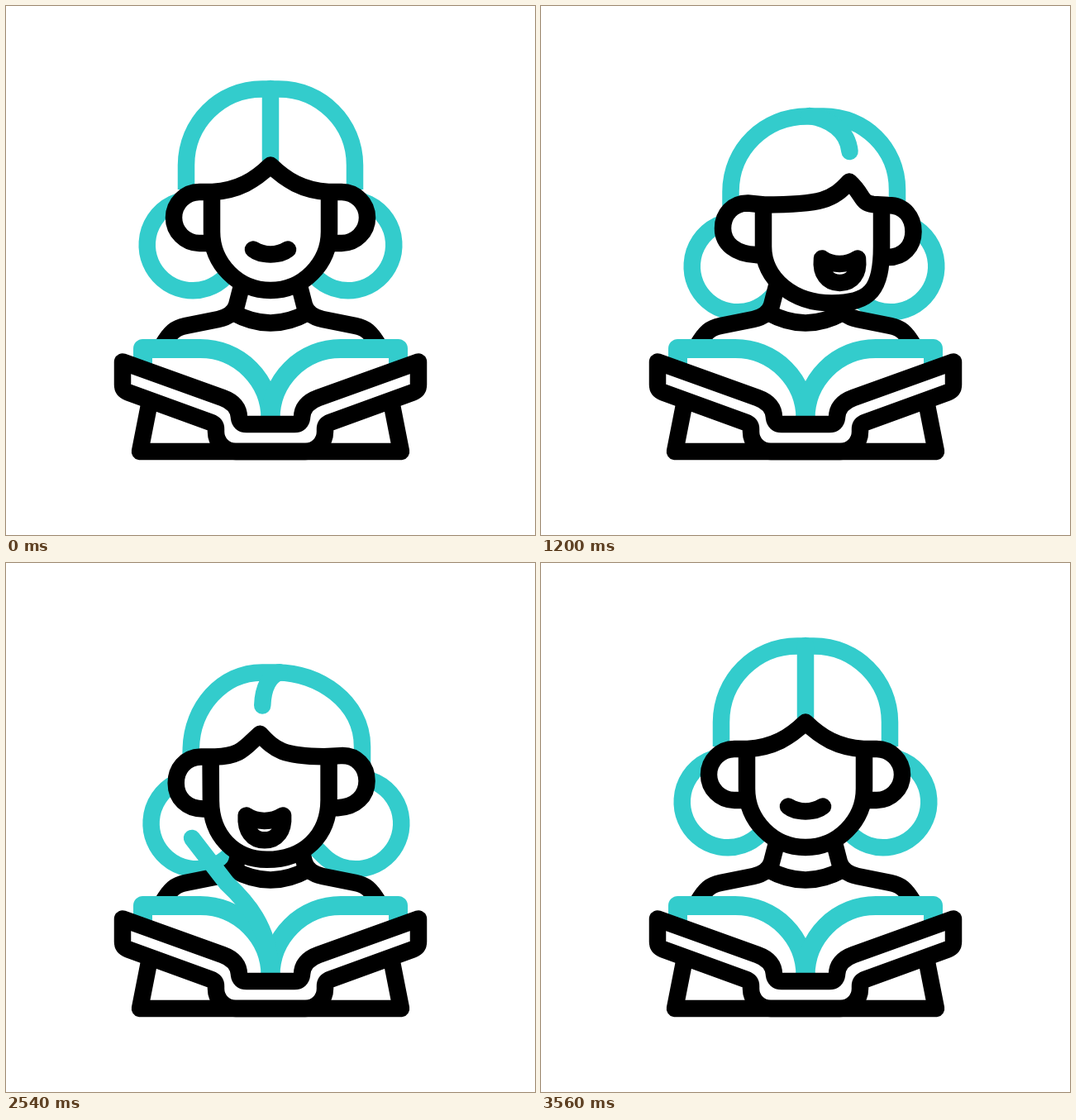
Recreate the animation shown at these times as an HTML page with a canvas. Size 640x640 px, loop 3.6 s.

```html
<!DOCTYPE html>
<html lang="en">
<head>
<meta charset="utf-8">
<title>Reading girl</title>
<style>
html, body { margin: 0; height: 100%; overflow: hidden; background: #fff; }
canvas { display: block; width: 640px; height: 640px; }
</style>
</head>
<body>
<canvas id="stage" width="640" height="640"></canvas>
<script>
const ctx = document.getElementById('stage').getContext('2d');
const CYAN = '#33cccc', BLACK = '#000', WHITE = '#fff';
const LOOP = 3600;

// Each part has three poses: facing front, facing left, facing right.
const parts = {
  dome: [
    'M218 222L218 192.5C218 141.5 259 100.5 310 100.5L330 100.5C381 100.5 422 141.5 422 192.5L422 222',
    'M221 238L221.5 224C223 176 257 132 305 132L323 132C372 132 431 166 431 222L431 248',
    'M229.5 242L229.5 225C229.5 173 271 133.5 322 133.5L342 133.5C391 133.5 431 172 431 222L431 248'
  ],
  parting: [
    'M320 100C320 130 320 160 320 187',
    'M333 132C307 136 287 150 285 171',
    'M325 133C349 137 371 150 373.5 176'
  ],
  face: [
    'M249 225L249 273C249 312 281 344 320 344C359 344 391 312 391 273L391 225',
    'M239 232L239.5 287C240 330 265 358.5 301 358.5C345 358.5 382 325 382 285L382 232',
    'M269 240L269 291C269 330 305 359.5 352 359.5C399 359.5 412 343 412 291L412 240'
  ],
  fringe: [
    'M249 287L234 287C217 287 203 273 203 256C203 239 217 225 234 225L250 225C281 223 301 211 320 192.5C339 211 359 223 390 225L406 225C423 225 437 239 437 256C437 273 423 287 406 287L391 287',
    'M240 296L230 296C212 296 200 283 200 265C200 249 210 234 230 233L246 232C262 231 262 220 281 204.5C300 226.5 315 231.5 378 232L398 230C418 228 431 243 431 260C431 278 417 292 394 293L381 293',
    'M270 302L260 301C236 300 220 288 220 269C220 252 232 238.5 250 238.5L270 240.5C340 240.5 353 234.5 373 212.5C391 229 386 238 402 240L420 241C440 241 450.5 256 450.5 273C450.5 291 438 304 420 304L411 304'
  ],
  mouth: [
    'M299 294.5C312 302.5 328 302.5 341 294.5C338 297 331 300.5 320 300.5C309 300.5 302 297 299 294.5Z',
    'M271 305.5C284 314 302 314 316 305.5C317 324 308 335.5 293.5 335.5C279 335.5 270 324 271 305.5Z',
    'M340 305.5C352 314 370 314 383 305.5C385 324 376 335 361.5 335C347 335 338 324 340 305.5Z'
  ],
  buns: ['M226 289L414 289', 'M228 315L423 315', 'M238 315L423 315']
};

const [FRONT, LEFT, RIGHT] = [0, 1, 2];
const moves = [
  { start: 0, end: 400, from: FRONT, to: LEFT },
  { start: 800, end: 1200, from: LEFT, to: RIGHT, page: true },
  { start: 1600, end: 2000, from: RIGHT, to: LEFT },
  { start: 2400, end: 2800, from: LEFT, to: RIGHT, page: true },
  { start: 3200, end: 3560, from: RIGHT, to: FRONT }
];

const NUMBER = /[\d.]+/g;
const ease = p => p * p * (3 - 2 * p);

function mix(a, b, u) {
  const target = b.match(NUMBER);
  let i = 0;
  return a.replace(NUMBER, n => (+n + (target[i++] - n) * u).toFixed(3));
}

function fill(d, color = WHITE) {
  ctx.fillStyle = color;
  ctx.fill(new Path2D(d));
}

function stroke(d, color = BLACK, width = 20.5, cap = 'butt') {
  ctx.strokeStyle = color;
  ctx.lineWidth = width;
  ctx.lineCap = cap;
  ctx.lineJoin = 'round';
  ctx.stroke(new Path2D(d));
}

function strokeBoth(d, color, width) {
  stroke(d, color, width);
  ctx.save();
  ctx.transform(-1, 0, 0, 1, 640, 0);
  stroke(d, color, width);
  ctx.restore();
}

// Open loops whose lower ends run straight on behind the face.
function drawBuns(d) {
  const [x1, y1, x2, y2] = d.match(NUMBER).map(Number);
  const r = 55.3;
  for (const [x, y, side] of [[x1, y1, -1], [x2, y2, 1]]) {
    const sweep = side > 0 ? 1 : 0;
    stroke(`M${x} ${y - r}A${r} ${r} 0 1 ${sweep} ${x - side * r * Math.SQRT1_2} ${y + r * Math.SQRT1_2}` +
      `l${-10 * side} -10`, CYAN, 20.5, 'round');
  }
}

function drawBody() {
  fill('M286 335L277 372H363L354 335Z');
  strokeBoth('M189 411C199 394 205 389.5 217 387L257 379Q275 375 279 362L286 335');
  stroke('M275 371Q320 396 365 371');
}

function drawPage(u) {
  const c = Math.cos(Math.PI * u), s = Math.sin(Math.PI * u);
  const at = (dx, y, lift) => `${320 - dx * c} ${y - lift * s} `;
  stroke('M320 490C' + at(4, 440, 0) + at(45, 414.5, 5) + at(85, 414.5, 35) +
    'L' + at(152, 414.5, 104.5), CYAN, 20.5, 'round');
}

function drawCover() {
  strokeBoth('M174 478L162 539H320');
  strokeBoth('M320 506H291Q283 506 282 498Q281.5 481 262 474L141 430.5' +
    'V458Q141 465 148 467.5L247 503.5Q254 506 254 512V515A24 24 0 0 0 278 539H320');
}

function draw(time) {
  const t = time % LOOP;
  const move = moves.filter(m => m.start <= t).pop();
  const u = ease(Math.min(1, (t - move.start) / (move.end - move.start)));
  const pose = {};
  for (const name in parts) pose[name] = mix(parts[name][move.from], parts[name][move.to], u);

  ctx.fillStyle = WHITE;
  ctx.fillRect(0, 0, 640, 640);

  drawBuns(pose.buns);
  stroke(pose.dome, CYAN);
  stroke(pose.parting, CYAN, 20.5, 'round');
  drawBody();

  fill(pose.fringe);
  fill(pose.face);
  stroke(pose.face);
  stroke(pose.fringe);
  fill(pose.mouth);
  stroke(pose.mouth);

  strokeBoth('M165.5 436V414.5H235A85 85 0 0 1 320 500', CYAN, 23);
  if (move.page && u > 0 && u < 1) drawPage(u);
  drawCover();
}

const begin = performance.now();
function tick() {
  draw(performance.now() - begin);
  requestAnimationFrame(tick);
}
tick();
</script>
</body>
</html>
```
